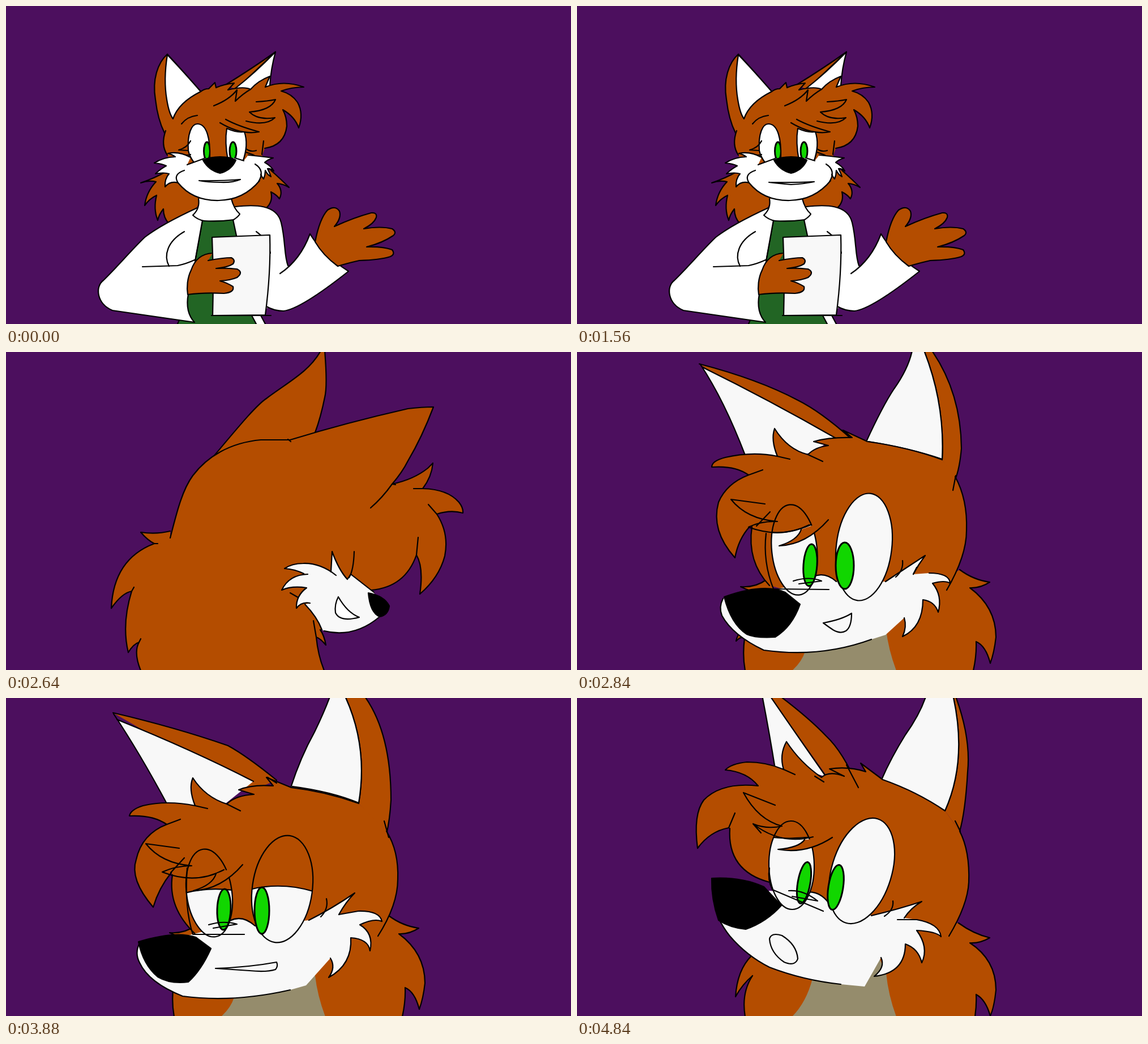
Write an HTML page with a canvas that moves like this. It is 998 by 561 pixels and loops after 5.68 s.

```html
<!DOCTYPE html>
<html lang="en">
<head>
<meta charset="utf-8">
<title>Talking fox</title>
<style>
  html, body { margin: 0; width: 100%; height: 100%; overflow: hidden; background: #4c0f5e; }
  canvas { display: block; width: 100%; height: 100%; }
</style>
</head>
<body>
<canvas id="stage" width="998" height="561"></canvas>
<script>
const ctx = document.getElementById('stage').getContext('2d');
const LOOP = 5680, STEP = 40;
const FUR = '#b44d00', WHITE = '#fff', PALE = '#f8f8f8', SHIRT = '#226524',
      IRIS = '#11d600', TAN = '#958c6c', BLACK = '#000', NIGHT = '#4c0f5e';
const NUM = /-?\d+(\.\d+)?/g;

const clamp = v => Math.max(0, Math.min(1, v));
const ease = (t, a, b) => { const k = clamp((t - a) / (b - a)); return k * k * (3 - 2 * k); };
const wave = (t, start, period) => Math.abs(Math.sin(Math.PI * (t - start) / period));

// Blend two paths that share the same commands.
function mix(a, b, k) {
  if (!b || k === 0) return a;
  const to = b.match(NUM);
  let i = 0;
  return a.replace(NUM, v => (+v + (to[i++] - v) * k).toFixed(2));
}

// "J" is a segment that is filled but not inked.
function shape(fill, d, ink = true) {
  if (fill) {
    ctx.fillStyle = fill;
    ctx.fill(new Path2D(d.replace(/J/g, 'L')));
  }
  if (ink) ctx.stroke(new Path2D(d.replace(/J/g, 'M')));
}
const drawAll = (parts, k = 0) => parts.forEach(([fill, a, b]) => shape(fill, mix(a, b, k)));

function oval([x, y, rx, ry, deg = 0]) {
  const p = new Path2D();
  p.ellipse(x, y, rx, ry, deg * Math.PI / 180, 0, 7);
  return p;
}
function iris(spec) {
  const p = oval(spec);
  ctx.fillStyle = IRIS;
  ctx.fill(p);
  ctx.lineWidth = 3;
  ctx.stroke(p);
  ctx.lineWidth = 2.2;
}

/* ---------- medium shot ---------- */

const hairLeft = 'M283 292 Q262 304 238 312 Q252 307 265 310 Q248 328 245 352 Q253 340 266 334 Q260 358 268 378 Q270 368 278 358 Q278 374 288 384 J330 368 J345 340 J330 292';
const hairRight = 'M468 290 Q486 306 500 320 Q490 314 479 313 Q490 326 483 340 Q478 333 468 328 Q472 345 460 356 J400 356 J395 330 J440 290';

const body = [
  [WHITE, 'M405 354 C440 350 478 350 486 382 C494 415 491 440 498 458 J500 470 J462 532 J450 546 L458 561 J330 561 J333 360'],
  [WHITE, 'M484 472 Q520 448 537 402 Q558 438 605 468 Q520 535 490 538 Q474 538 460 530',
          'M491 458 Q545 452 571 422 Q565 470 598 512 Q520 522 490 524 Q470 524 460 514'],
  [SHIRT, 'M401 377 L407 405 L434 546 L442 561 J303 561 L306 554 J320 510 J334 450 L347 378'],
  [WHITE, 'M338 356 C290 378 262 395 245 408 C222 430 195 462 172 484 C157 495 160 525 188 537 L333 558 Q316 540 322 508 J333 448 J347 378',
          'M338 356 C290 378 262 395 245 408 C222 430 195 462 172 484 C157 495 160 525 188 537 L322 566 Q317 545 320 518 J340 460 J347 378'],
  [null, 'M334 450 L347 378'],
  [null, 'M241 460 Q270 459 303 458 Q318 455 333 448', 'M250 463 Q280 465 309 466 Q325 465 340 460'],
  [null, 'M315 398 C285 415 278 440 288 459 M442 398 Q462 412 467 436'],
  [WHITE, 'M340 340 Q343 357 330 369 Q338 377 350 379 J402 377 Q410 372 413 367 Q402 357 398 340'],
  [null, 'M350 379 Q375 381 402 377']
];
const props = [
  [PALE, 'M364 408 L466 404 Q468 470 458 545 L365 546 Q367 480 364 408', 'M376 422 Q430 425 478 437 L447 563 Q400 561 350 556 Q366 490 376 422'],
  [FUR, 'M365 436 C345 437 333 448 327 466 C320 480 319 497 321 509 Q350 505 385 507 Q404 505 401 495 Q390 488 378 485 Q396 484 408 479 Q420 470 408 464 Q388 462 371 463 Q392 461 401 455 Q406 448 398 444 Q384 444 357 449 J365 436',
        'M371 460 C350 457 335 465 329 482 C320 502 318 512 320 519 Q340 528 367 534 Q384 537 384 530 Q380 519 357 506 Q380 514 396 516 Q407 514 402 507 Q385 497 366 489 Q382 492 396 490 Q404 485 396 480 Q380 474 355 469 J371 460'],
  [FUR, 'M586 459 Q560 440 546 416 Q554 375 568 360 Q582 351 589 362 Q593 374 580 389 Q615 373 645 365 Q656 364 654 373 Q650 384 632 393 Q662 388 682 393 Q691 399 684 405 Q665 418 637 425 Q665 424 682 430 Q688 438 679 442 Q660 448 624 449 Q602 454 586 459',
        'M577 484 Q566 450 573 424 Q596 404 625 396 Q642 395 641 407 Q637 424 616 427 Q655 440 680 447 Q690 453 685 460 Q668 465 637 459 Q668 475 688 488 Q698 499 687 504 Q670 502 642 493 Q660 508 666 520 Q665 531 652 529 Q628 518 600 500 Q588 491 577 484']
];
const skull = [
  [FUR, 'M285 85 C268 100 258 130 264 165 Q268 200 280 224 J310 220 J344 151 Q310 112 285 85'],
  [WHITE, 'M285 86 Q278 130 284 165 Q288 190 295 199 Q305 172 344 151 Q310 112 285 86'],
  [FUR, 'M476 81 Q435 110 388 139 J406 147 L476 81'],
  [WHITE, 'M476 81 Q440 118 404 146 J420 160 J466 140 Q468 110 476 81'],
  [FUR, 'M282 220 Q273 245 285 263 J300 300 J440 300 J457 251 Q492 246 496 212 Q496 196 489 183 Q510 195 517 215 Q526 190 515 170 Q505 155 486 150 Q505 143 526 143 Q490 130 458 143 L466 124 Q445 132 432 147 Q420 141 392 148 L403 136 Q385 138 371 144 L369 135 L358 146 Q350 146 344 151 Q305 170 295 199 J282 220'],
  [null, 'M310 208 Q320 195 338 193 M367 176 Q395 165 408 148 L405 168 Q418 155 432 147'],
  [null, 'M442 169 Q462 168 476 165 Q468 184 430 187 Q445 202 475 197 Q460 212 424 203'],
  [null, 'M388 200 Q410 212 447 222 Q415 228 378 206 M455 238 L452 262']
];
const eyes = [
  ['M322 255 C320 225 328 208 338 208 C355 208 361 235 360 268 L332 276 Q324 265 322 255', [355, 256, 5.5, 16]],
  ['M390 216 Q386 240 392 272 L418 275 Q429 245 421 222 Q408 224 390 216', [401, 256, 6, 16]]
];
const muzzle = [
  [null, 'M326 238 Q320 250 305 254 L322 255 M312 262 Q320 264 326 262 M424 252 Q432 258 442 255 M424 258 L438 263'],
  [WHITE, 'M326 267 Q306 256 286 260 Q294 262 299 266 Q277 267 262 277 Q275 278 283 282 Q272 288 264 296 Q278 293 288 296 Q280 305 281 319 Q290 308 304 312 Q330 344 376 343 Q420 342 448 308 J450 297 Q452 302 455 305 Q458 298 458 290 Q462 298 468 301 Q466 295 462 287 Q466 286 473 291 Q468 282 457 276 Q462 271 472 268 Q450 265 428 263 J420 273 L404 268 J350 269 L320 280'],
  [null, 'M315 290 Q294 297 304 312 M440 279 Q458 290 446 310'],
  [BLACK, 'M348 272 Q360 266 378 266 Q398 266 406 272 Q398 290 378 295 Q358 290 348 272']
];
const talk = {
  rest: 'M341 308 Q375 309 414 306 Q400 312 378 311 Q355 311 341 308',
  flat: 'M339 311 Q378 312 419 310 Q400 314 378 315 Q355 313 339 311',
  open: 'M342 302 Q378 306 416 299 Q405 329 378 330 Q350 328 342 302',
  grin: 'M350 308 Q380 310 408 304 Q395 321 378 321 Q365 319 350 308',
  laugh: 'M350 305 Q380 309 408 301 Q398 332 378 332 Q360 330 350 305'
};

function lidded([d, spec], k) {
  const p = new Path2D(d);
  ctx.fillStyle = WHITE;
  ctx.fill(p);
  ctx.save();
  ctx.clip(p);
  iris(spec);
  if (k > 0) {
    const top = 205 + 38 * k, low = 282 - 24 * k;
    shape(FUR, `M300 190 J440 190 J440 ${top} L300 ${top}`);
    shape(FUR, `M300 300 J440 300 J440 ${low} L300 ${low}`);
  }
  ctx.restore();
  ctx.stroke(p);
}

function tilted(deg, draw) {
  ctx.save();
  ctx.translate(378, 280);
  ctx.rotate(deg * Math.PI / 180);
  ctx.translate(-378, -280);
  draw();
  ctx.restore();
}

function mediumShot(t) {
  const k = ease(t, 1800, 1920), tilt = 12 * k;
  ctx.save();
  ctx.translate(12 * k, -6 * k);
  shape(FUR, hairLeft);
  ctx.restore();
  tilted(tilt, () => shape(FUR, hairRight));
  drawAll(body, k);
  drawAll(props, k);
  if (k < .5) shape(null, 'M363 546 L468 546');
  tilted(tilt, () => {
    drawAll(skull);
    eyes.forEach(e => lidded(e, k));
    drawAll(muzzle);
  });
  let mouth;
  if (t >= 1840) mouth = mix(talk.grin, talk.laugh, wave(t, 1920, 160) * .7);
  else if (t >= 640) mouth = mix(talk.flat, talk.open, wave(t, 640, 184));
  else mouth = mix(talk.rest, talk.open, t > 280 && t < 440 ? wave(t, 280, 160) : 0);
  shape(WHITE, mouth);
}

/* ---------- head turned away ---------- */

const turned = [
  [FUR, 'M360 192 C400 145 440 95 460 82 C500 52 535 35 556 -2 L563 -2 Q568 60 563 80 Q556 115 546 142 J500 170'],
  [FUR, 'M290 328 C300 290 310 245 330 218 C355 185 395 160 450 155 L502 155 Q600 125 710 100 Q735 97 755 97 Q735 150 710 192 Q700 212 682 233 Q720 225 745 205 L754 196 Q752 220 736 241 Q780 242 800 265 Q808 275 807 284 Q785 278 761 286 Q783 320 775 360 Q765 398 731 427 Q738 380 725 358 Q705 415 645 420 J600 470 J555 490 Q562 500 565 517 Q555 505 548 503 Q551 535 562 562 J238 562 Q225 530 235 512 Q225 515 216 530 Q204 480 222 422 Q205 425 186 452 Q190 365 262 338 Q250 332 238 318 Q265 322 290 316'],
  [null, 'M644 275 Q665 257 682 233 L688 234 M720 241 L736 241 M746 269 L761 286 M728 327 L725 358 M262 338 L268 338 M226 415 L222 422 M238 506 L235 512 M543 474 L548 503 M502 425 L516 433 M498 154 L503 158'],
  [PALE, 'M583 394 Q555 372 525 373 Q505 373 492 382 Q510 383 526 391 J533 392 Q500 393 487 420 Q505 412 531 416 Q512 430 513 452 Q522 440 537 443 J528 445 Q550 468 558 490 J562 492 Q615 505 660 467 J650 424 L609 392 L603 401 Q588 385 576 352 L574 388 J583 394'],
  [null, 'M615 352 Q614 385 606 398'],
  [BLACK, 'M640 425 Q668 430 677 448 Q675 464 660 467 Q643 460 640 425'],
  [WHITE, 'M587 432 Q580 445 582 460 Q590 477 624 468 Q603 460 587 432']
];

/* ---------- close-up: three poses per part ---------- */

const back = [
  [FUR, 'M302 488 Q284 492 281 510 Q290 500 298 505 J330 505 J320 480', , 'M308 455 Q283 480 280 527 Q292 505 310 490 J400 510 J340 445'],
  [FUR, 'M676 384 Q700 402 729 406 Q712 417 694 416 Q740 450 740 503 Q737 530 730 549 Q722 518 705 511 Q706 535 700 562 J297 562 Q292 535 296 505 J330 470 J650 400', ,
        'M674 397 Q700 416 729 423 Q712 433 694 432 Q740 462 740 515 Q737 545 730 561 Q722 532 705 523 Q706 540 703 562 J297 562 Q290 520 310 490 J340 450 J650 400'],
  [FUR, 'M334 402 Q315 416 289 414 Q305 422 322 425 J350 420', , 'M390 402 Q380 406 370 404 Q376 402 382 405 J390 410']
];
const chest = ['M403 528 Q397 547 380 562 J564 562 Q550 525 546 490 J500 480', , 'M416 495 Q405 537 380 562 J564 562 Q550 525 546 485 J532 455'];
const front = [
  [FUR, 'M216 21 Q320 48 390 85 Q430 105 482 151 J440 165 J216 21', 'M189 26 Q300 52 392 84 Q425 102 478 145 J430 165 J189 26', 'M322 -30 Q400 25 440 67 Q470 95 497 158 J450 150 J322 -30'],
  [PALE, 'M218 22 Q260 85 297 182 J352 192 J412 178 J457 152 Q340 85 222 27', 'M190 28 Q235 95 285 188 J335 195 J388 186 J437 147 Q330 92 196 38', 'M322 -30 Q338 50 350 125 J370 130 J410 130 J440 139 Q395 75 340 -5'],
  [FUR, 'M612 -5 L625 -5 Q678 70 679 170 Q676 205 668 225 J645 190 Q650 90 612 -5', 'M598 -5 L632 -5 Q680 60 680 180 Q678 215 672 240 J623 186 Q640 85 598 -5', 'M664 -5 L668 -5 Q696 70 690 130 Q686 200 676 235 J650 199 Q690 110 664 -5'],
  [PALE, 'M511 158 Q540 95 560 65 Q585 30 592 -2 J612 -5 Q650 90 645 189 Q590 170 515 158', 'M503 158 Q520 105 545 60 Q562 25 572 -2 J598 -5 Q640 85 623 185 Q575 165 506 156', 'M538 144 Q555 105 580 65 Q605 30 616 -2 J664 -5 Q690 110 650 199 Q600 170 541 148'],
  [FUR, 'M668 220 Q690 260 688 315 Q688 360 653 420 J560 470 J340 412 Q300 370 309 308 J305 308 Q285 330 279 363 Q236 315 250 265 Q264 232 303 217 Q280 200 238 203 Q238 192 262 186 Q310 175 354 184 Q342 155 349 135 Q372 172 408 181 Q420 168 444 165 L418 158 Q445 150 486 151 L470 138 L513 158 Q585 168 645 190',
        'M672 235 Q694 270 692 320 Q692 365 657 420 J560 470 J335 417 Q285 370 294 312 J292 308 Q270 335 260 369 Q218 320 230 285 Q240 240 284 223 Q260 206 218 208 Q220 197 242 190 Q285 180 334 190 Q322 160 330 141 Q352 175 390 187 Q405 172 438 170 L411 162 Q435 152 472 155 L460 140 L504 158 Q565 165 623 186',
        'M676 235 Q694 270 692 325 Q690 365 657 420 J400 470 J340 325 Q265 305 270 230 J268 229 Q235 235 213 265 Q205 205 224 180 Q255 148 320 155 Q300 130 262 127 Q272 116 300 113 Q335 113 365 126 Q357 100 370 77 Q395 115 432 140 Q445 128 472 138 L446 125 Q480 120 510 130 L501 115 L540 144 Q600 165 650 199'],
  [null, 'M303 217 L328 208 M354 184 L376 189 M408 181 L434 193 M664 244 L669 218 M468 138 L482 151', 'M284 223 L308 214 M334 190 L356 195 M390 187 L414 199 M668 217 L676 246 M462 140 L478 150', 'M268 229 L279 203 M365 126 L385 135 M420 138 L436 148 M668 217 L677 235 M476 118 L497 158'],
  [PALE, 'M258 435 Q250 450 256 465 Q275 500 330 526 Q430 540 520 507 J545 499 J578 469 Q583 485 575 502 Q611 485 611 437 Q632 440 638 459 Q646 430 628 408 Q650 402 659 408 Q658 390 622 390 J594 392 Q603 375 615 359 Q575 385 545 405 J458 405 Q430 380 400 408 J345 420',
         'M236 432 Q227 450 236 467 Q252 502 312 526 Q400 538 502 515 J530 507 J573 459 Q583 475 570 493 Q612 470 609 423 Q640 425 643 446 Q650 415 625 400 Q650 388 664 394 Q660 375 622 376 J588 382 Q600 360 616 344 Q575 372 535 392 J440 402 Q410 375 380 404 J325 418',
         'M250 388 Q258 405 270 420 Q300 455 340 475 Q400 498 466 505 J508 509 J537 458 Q545 475 525 491 Q580 485 580 434 Q603 442 609 467 Q622 440 600 410 Q635 412 643 421 Q640 398 600 391 J578 388 Q590 370 609 359 Q570 372 520 384 J445 362 Q425 335 395 345 J340 340'],
  [null, 'M594 392 L600 380 M575 368 Q577 385 563 397', 'M588 382 L622 376 M566 354 Q570 372 556 386', 'M566 391 L600 391 M558 358 Q560 374 543 385']
];
// Eye oval, lid curve and iris.
const bigEyes = [
  { oval: ['384 349 40 80 -6', '359 344 40 78 -8', '379 295 40 78 -1'],
    lid: ['M335 317 Q375 325 430 297', 'M310 346 Q350 333 402 339', 'M335 244 Q370 251 425 244'],
    iris: ['412 376 12 37 4', '385 373 12 36 2', '401 326 11 37 10'] },
  { oval: ['507 344 49 95 7', '488 337 53 95 8', '503 305 53 96 17'],
    lid: ['M445 240 Q510 230 570 240', 'M430 338 Q490 323 552 344', 'M435 200 Q510 190 575 200'],
    iris: ['473 377 16 41 0', '452 375 13 41 0', '457 334 13 40 9'] }
];
const details = [
  [null, 'M332 268 L272 260 Q300 295 354 299 M341 282 L317 307 M354 299 Q325 298 303 309 Q360 330 410 305', 'M306 265 L247 257 Q275 292 328 296 M315 282 L291 308 M328 296 Q300 296 276 307 Q335 330 385 303', 'M350 189 L294 167 Q320 215 362 226 M311 222 L325 238 M362 226 Q335 232 311 222 Q360 260 417 245'],
  [FUR, 'M444 296 Q405 340 357 342 Q390 332 396 313', 'M418 294 Q380 338 331 340 Q365 330 371 310', 'M451 246 Q405 276 355 267 Q392 264 402 250'],
  [null, 'M334 320 Q328 370 347 418 L445 419 M382 404 Q410 395 432 404 L392 409', 'M320 300 Q315 370 330 417 L421 417 M358 400 Q385 392 408 399 L366 406', 'M340 300 Q336 320 345 338 L435 376 M374 340 Q400 338 425 358 L380 350'],
  [BLACK, 'M260 432 Q330 407 368 424 L394 445 Q380 485 350 503 Q315 505 300 498 Q272 480 260 432', 'M234 430 Q300 410 335 422 L362 442 Q345 480 322 501 Q290 505 268 492 Q242 470 234 430', 'M238 318 Q290 315 330 333 L361 366 Q335 395 298 408 Q270 405 250 392 Q237 355 238 318']
];
const lips = ['M435 478 Q468 472 485 461 Q485 485 475 492 Q465 498 452 490 Q443 484 435 478',
              'M370 477 Q430 475 478 466 Q481 473 476 479 Q460 484 430 481 Q400 479 370 477',
              'M340 425 Q343 413 362 419 Q388 435 390 460 Q385 474 366 466 Q342 450 340 425'];
const wideLips = 'M363 462 Q425 466 487 443 Q490 475 470 495 Q450 508 420 500 Q385 490 363 462';

function closeUp(t) {
  const k1 = ease(t, 2840, 2960), k2 = ease(t, 4440, 4560);
  const pose = ([a, b = a, c = b]) => mix(mix(a, b, k1), c, k2);
  const paint = parts => parts.forEach(([fill, ...d]) => shape(fill, pose(d)));
  const nums = d => pose(d).split(' ').map(Number);

  paint(back);
  shape(TAN, pose(chest), false);
  paint(front);
  bigEyes.forEach(e => {
    const p = oval(nums(e.oval)), lid = pose(e.lid);
    ctx.fillStyle = PALE;
    ctx.fill(p);
    ctx.save();
    ctx.clip(p);
    shape(FUR, lid + ' J600 100 J300 100');
    ctx.restore();
    ctx.stroke(p);
    iris(nums(e.iris));
  });
  paint(details);
  const speak = t >= 3040 && t < 4440 ? wave(t, 3040, 168) : 0;
  shape(PALE, mix(pose(lips), wideLips, speak));
}

function frame(now) {
  const t = Math.floor(now % LOOP / STEP) * STEP;
  ctx.fillStyle = NIGHT;
  ctx.fillRect(0, 0, 998, 561);
  ctx.strokeStyle = BLACK;
  ctx.lineWidth = 2.2;
  ctx.lineCap = ctx.lineJoin = 'round';
  if (t < 2520) mediumShot(t);
  else if (t < 2760) drawAll(turned);
  else closeUp(t);
}

const start = performance.now();
function loop() {
  frame(performance.now() - start);
  requestAnimationFrame(loop);
}
loop();
</script>
</body>
</html>
```
